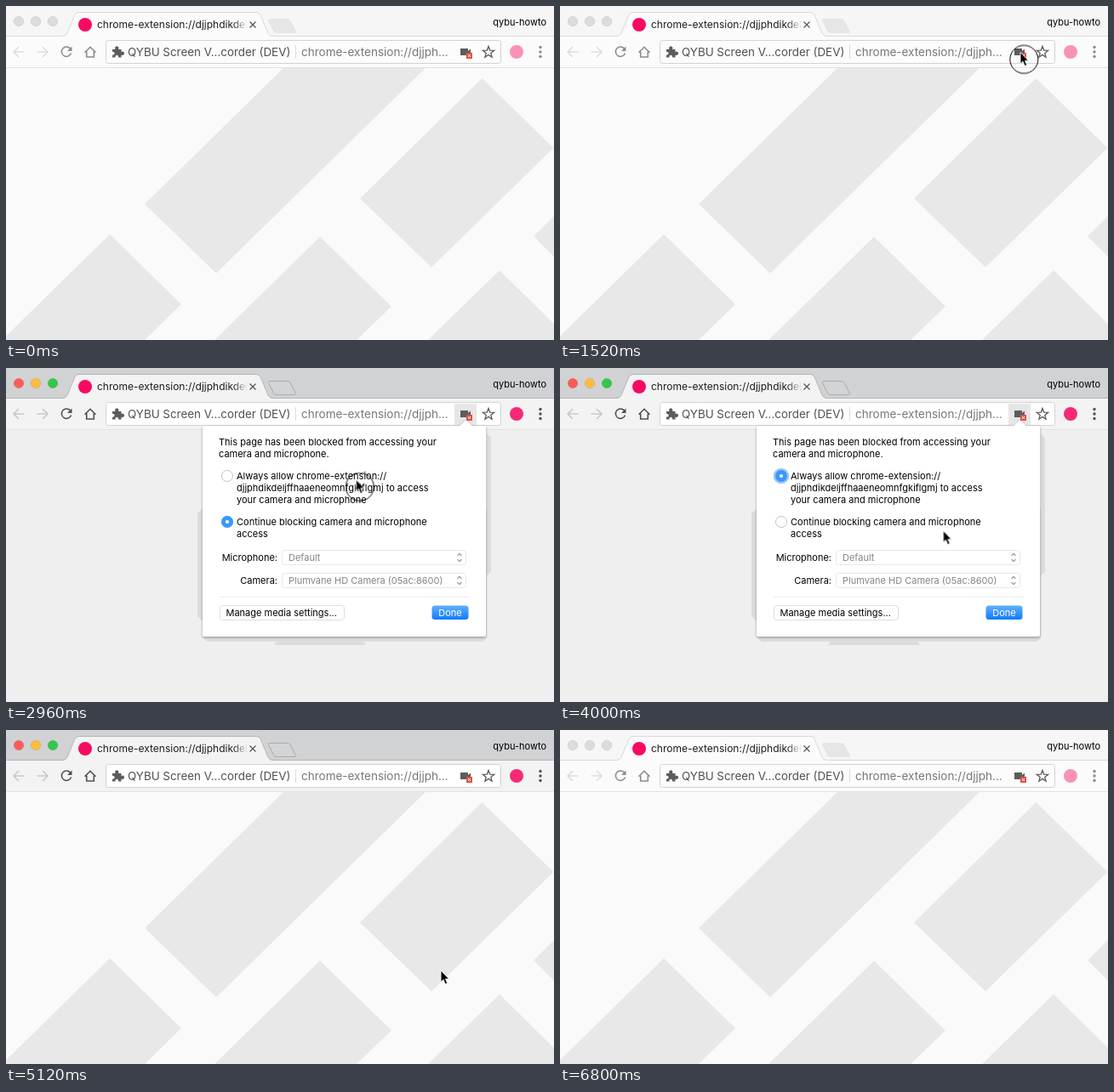
An HTML page that plays this animation: 644x393 px, repeating every 6880 ms.

```html
<!DOCTYPE html>
<html lang="en">
<head>
<meta charset="utf-8">
<title>Allow camera and microphone</title>
<style>
html, body { margin: 0; width: 100%; height: 100%; overflow: hidden; background: #fafafa; }
svg { display: block; width: 100vw; height: 100vh; animation: focus 6.88s step-end infinite; }
text { font-family: Inter, "Liberation Sans", sans-serif; font-size: 11px; fill: #000; white-space: pre; }
.tab { font-size: 12px; fill: #1c1c1c; }
.url { font-size: 13.5px; fill: #777; }
.name { font-size: 13.4px; fill: #505050; }
.end { text-anchor: end; }
.soft text { fill: #858585; }
.stroke { fill: none; stroke: var(--icon); stroke-width: 1.6; }

/* window colours: in the background, then focused */
@keyframes focus {
  0%, 98.692%, 100% {
    --bar: #f6f6f6; --tool: #fbfbfb; --edge: #d9d9d9; --plus: #e6e6e6; --plusEdge: #e6e6e6;
    --icon: #8c8c8c; --dim: #dedede; --field: #fcfcfc; --mark: .5;
    --red: #dcdcdc; --amber: #dcdcdc; --green: #dcdcdc;
  }
  23.11% {
    --bar: #d0d2d4; --tool: #f3f3f3; --edge: #b4b6b8; --plus: #d2d4d5; --plusEdge: #a9abad;
    --icon: #515151; --dim: #c9c9c9; --field: #fff; --mark: 1;
    --red: #fc5b57; --amber: #fdbc40; --green: #34c84a;
  }
}

#blank { animation: blank 6.88s step-end infinite; }
@keyframes blank { 0%, 73.11%, 100% { visibility: hidden; } 23.11% { visibility: visible; } }

#popup, #lit { animation: popup 6.88s linear infinite; }
@keyframes popup {
  0%, 23.1% { opacity: 0; }
  23.11%, 72.4% { opacity: 1; }
  74.27%, 100% { opacity: 0; }
}

#warm { animation: warm 6.88s step-end infinite; }
@keyframes warm { 0% { opacity: .85; } 24.273%, 100% { opacity: 1; } }

#allow { animation: allow 6.88s step-end infinite; }
@keyframes allow { 0% { opacity: 0; } 51.017%, 100% { opacity: 1; } }
#block { animation: block 6.88s step-end infinite; }
@keyframes block { 0% { opacity: 1; } 51.017%, 100% { opacity: 0; } }

#allowGlow { animation: allowGlow 6.88s linear infinite; }
@keyframes allowGlow { 0%, 43.9% { opacity: 0; } 48.7%, 100% { opacity: 1; } }
#blockGlow { animation: blockGlow 6.88s step-end infinite; }
@keyframes blockGlow { 0% { opacity: 1; } 42.878%, 100% { opacity: 0; } }

#cursor { animation: move 6.88s ease-in-out infinite; }
@keyframes move {
  0%, 5.814% { transform: translate(188px, 397px); }
  16.279% { transform: translate(536px, 50px); }
  20.785%, 32.558% { transform: translate(541px, 54.5px); }
  40.698%, 53.488% { transform: translate(411.5px, 131.5px); }
  63.953% { transform: translate(507px, 279px); }
  67.442%, 87.209% { transform: translate(511px, 283px); }
  88.372% { transform: translate(509.5px, 285px); }
  95.349%, 100% { transform: translate(188px, 397px); }
}

#press { animation: press 6.88s step-end infinite; }
@keyframes press {
  0%, 24.273%, 45.203%, 71.948%, 100% { opacity: 0; }
  20.785%, 42.878%, 69.622% { opacity: 1; }
}
</style>
</head>
<body>
<svg viewBox="0 0 644 393" preserveAspectRatio="none">
  <defs>
    <linearGradient id="fade">
      <stop offset=".9" stop-color="#fff"/>
      <stop offset="1" stop-color="#fff" stop-opacity="0"/>
    </linearGradient>
    <mask id="tabMask"><rect x="105" y="8" width="179" height="26" fill="url(#fade)"/></mask>
    <linearGradient id="blue" x2="0" y2="1">
      <stop offset="0" stop-color="#62b0fa"/>
      <stop offset="1" stop-color="#107afb"/>
    </linearGradient>
    <filter id="shadow" x="-10%" y="-10%" width="120%" height="125%">
      <feDropShadow dx="0" dy="1" stdDeviation="1.5" flood-opacity=".35"/>
    </filter>
    <g id="off"><circle r="6.5" fill="#fff" stroke="#c2c2c2"/></g>
    <g id="on"><circle r="7" fill="#3b97fb"/><circle r="2.1" fill="#fff"/></g>
    <circle id="glow" r="9.3" fill="#9bc9f9"/>
    <g id="select">
      <rect x="324.5" y="-8.5" width="216" height="17" rx="3" fill="#fff" stroke="#e8e8e8"/>
      <path d="M530.5-2 533-4.7 535.5-2M530.5 2 533 4.7 535.5 2" fill="none" stroke="#8c8c8c" stroke-width="1.1"/>
    </g>
  </defs>

  <!-- page -->
  <rect width="644" height="393" fill="#fafafa"/>
  <path fill="#e8e8e8" d="M327 72H494L247 314.500 163 233ZM559.500 85 643.500 167 500 307.500 416 226.500ZM122 268.500 206 351 163 393H0V388.500ZM369 271.500 453 353.500 412 393H245ZM580 311 644 374V393H496ZM644 247 620 271 644 295Z"/>
  <g id="blank">
    <rect y="72" width="644" height="321" fill="#efefef"/>
    <path fill="#dcdcdc" d="M231 166 225 171V292L231 298V317L237 322H318L315 326H423L420 322H560L565 318V244L570 240V82L565 77V166Z"/>
  </g>

  <!-- title bar -->
  <rect width="644" height="36" fill="var(--bar)"/>
  <rect y="35" width="644" height="1" fill="var(--edge)"/>
  <rect y="36" width="644" height="36" fill="var(--tool)"/>
  <rect y="72" width="644" height="1" fill="#e2e2e2"/>
  <g stroke="#000" stroke-opacity=".1" stroke-width=".8">
    <circle cx="15" cy="18" r="5.800" fill="var(--red)"/>
    <circle cx="35" cy="18" r="5.800" fill="var(--amber)"/>
    <circle cx="55" cy="18" r="5.800" fill="var(--green)"/>
  </g>
  <path fill="var(--tool)" d="M66 36Q70.500 35.500 72 32L80.500 11.500Q82 8 85 8H295Q298 8 299.500 11.500L308 32Q309.500 35.500 314 36Z"/>
  <path fill="none" stroke="var(--edge)" d="M66 35.500Q70.500 35.500 72 32L80.500 11.500Q82 7.500 85 7.500H295Q298 7.500 299.500 11.500L308 32Q309.500 35.500 314 35.500"/>
  <path fill="var(--plus)" stroke="var(--plusEdge)" d="M310 15.500H331Q333 15.500 334 17.500L340 29Q341 31.500 339 31.500H318Q315.500 31.500 314.500 29.500L308.500 17.500Q308 15.500 310 15.500Z"/>
  <circle cx="93" cy="22" r="8" fill="#f80a63"/>
  <text class="tab" x="107" y="26" mask="url(#tabMask)">chrome-extension://djjphdikdel</text>
  <path d="M286.500 18.500 293.500 25.500M293.500 18.500 286.500 25.500" stroke="#555" stroke-width="1.2"/>
  <text class="end" x="635" y="23">qybu-howto</text>

  <!-- toolbar -->
  <path fill="none" stroke="var(--dim)" stroke-width="1.6" d="M21.500 54H9.500M15 48 9 54 15 60M36.500 54H48.500M43 48 49 54 43 60"/>
  <path class="stroke" d="M75.800 50.500A5.700 5.700 0 1 0 76.500 55.500"/>
  <path fill="var(--icon)" d="M77.500 47.500V53H72Z"/>
  <path class="stroke" d="M92.500 54.800 99 48.300 105.500 54.800M94.700 53.500V60H103.300V53.500"/>
  <rect x="117.500" y="40.500" width="464" height="27" rx="3" fill="var(--field)" stroke="#d2d2d2"/>
  <path fill="#5c5c5c" d="M125 51H128.500A2.200 2.200 0 1 1 132 51H135.500V54A2.200 2.200 0 1 1 135.500 57.500V60.500H132A1.900 1.900 0 1 0 128.500 60.500H125V57.500A1.900 1.900 0 1 0 125 54Z"/>
  <text class="name" x="143" y="59">QYBU Screen V...corder (DEV)</text>
  <rect x="340" y="46" width="1" height="16" fill="#dadada"/>
  <text class="url" x="347" y="59">chrome-extension://djjph...</text>
  <rect id="lit" x="527" y="42" width="26" height="25" fill="#e6e6e6"/>
  <path fill="#5c5c5c" d="M534 50H543V53L546 50.500V57H543V58H534Z"/>
  <rect x="541" y="55" width="7" height="7" fill="#d9534a"/>
  <path d="M543 57 546 60M546 57 543 60" stroke="#fff"/>
  <path fill="none" stroke="#5c5c5c" stroke-width="1.3" d="M567 47.500 568.700 52.100 573.700 52.300 569.800 55.400 571.100 60.200 567 57.400 562.900 60.200 564.200 55.400 560.300 52.300 565.300 52.100Z"/>
  <circle cx="600" cy="54" r="8" fill="#f52a76" style="opacity:var(--mark)"/>
  <g fill="var(--icon)">
    <circle cx="628" cy="48.500" r="1.700"/><circle cx="628" cy="54" r="1.700"/><circle cx="628" cy="59.500" r="1.700"/>
  </g>

  <!-- permission popup -->
  <g id="popup">
    <path filter="url(#shadow)" fill="#fff" d="M233 68H533.500L540.500 61.500 547.500 68H562Q564 68 564 70V314Q564 316 562 316H233Q231 316 231 314V70Q231 68 233 68Z"/>
    <text x="250" y="91">This page has been blocked from accessing your</text>
    <text x="250" y="105">camera and microphone.</text>
    <text x="271" y="131">Always allow chrome-extension://</text>
    <text x="271" y="145">djjphdikdeljffhaaeneomnfgkiflgmj to access</text>
    <text x="271" y="159">your camera and microphone</text>
    <text x="271" y="185">Continue blocking camera and microphone</text>
    <text x="271" y="199">access</text>
    <text class="end" x="319" y="227">Microphone:</text>
    <text class="end" x="319" y="254">Camera:</text>
    <use href="#select" y="223"/>
    <use href="#select" y="250"/>
    <g class="soft">
      <text x="332" y="227">Default</text>
      <text x="332" y="254">Plumvane HD Camera (05ac:8600)</text>
    </g>
    <rect x="251" y="269" width="294" height="1" fill="#ebebeb"/>
    <rect x="251.500" y="279.500" width="146" height="17" rx="3" fill="#fff" stroke="#dedede"/>
    <text x="258.500" y="292">Manage media settings...</text>
    <g id="warm">
      <rect x="500.500" y="279.500" width="43" height="16.500" rx="3.500" fill="url(#blue)"/>
      <g transform="translate(260 127)">
        <use id="allowGlow" href="#glow"/><use href="#off"/><use id="allow" href="#on"/>
      </g>
      <g transform="translate(260 181)">
        <use id="blockGlow" href="#glow"/><use href="#off"/><use id="block" href="#on"/>
      </g>
    </g>
    <text x="522" y="292" text-anchor="middle" style="fill:#fff">Done</text>
  </g>

  <!-- pointer -->
  <g id="cursor">
    <path d="M0 0V13.500L3 10.700 5.200 16 7.700 15 5.500 9.900H9.700Z" fill="#000" stroke="#fff" stroke-width=".9"/>
    <circle id="press" cx="4.300" cy="8.300" r="16.500" fill="none" stroke="#000"/>
  </g>
</svg>
</body>
</html>
```
